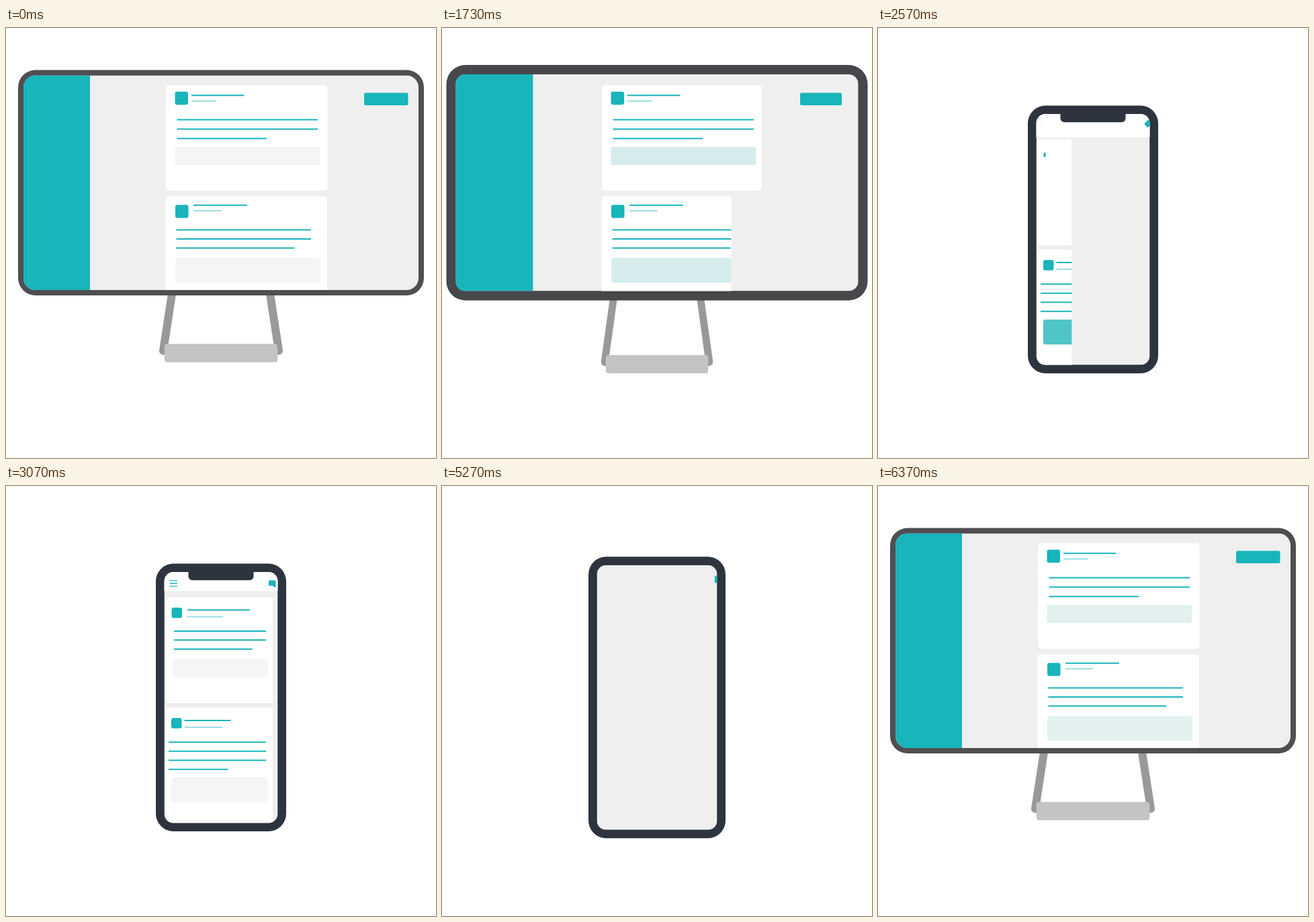
An HTML page with a canvas that plays this animation: 640 px wide and 640 px high, repeating every 7.56 s.

```html
<!DOCTYPE html>
<html lang="en">
<head>
<meta charset="utf-8">
<title>Responsive layout: desktop to phone</title>
<style>
  html, body { margin: 0; width: 100%; height: 100%; overflow: hidden; background: #fff; }
  canvas { display: block; width: 100vw; height: 100vh; }
</style>
</head>
<body>
<canvas id="stage" width="640" height="640"></canvas>
<script>
const ctx = document.getElementById('stage').getContext('2d');
const LOOP = 7560;
const TEAL = [24, 181, 187], PALE = [245, 245, 245];
const GRAY = [79, 79, 81], SLATE = [45, 52, 62];
const teal = rgb(TEAL, TEAL, 0), lightTeal = '#8fd9e0';

const desktop = { width: 240.5, radius: 5, icon: 19.5, paleGap: 8.4, boxWidth: 216, cards: [
  { x: 238, y: 85, iconX: 251.5, iconY: 94.7, boxY: 177,
    head: { x: 276, y: 100.2, width: 78.5, pale: 36.5 },
    body: { x: 254.5, y: 136.4, width: 209.5, rows: 3, step: 14, last: 133.5 } },
  { x: 237.5, y: 250.5, iconX: 252, iconY: 263.2, boxY: 342.3,
    head: { x: 279, y: 263.8, width: 80, pale: 41.5 },
    body: { x: 253.5, y: 300.5, width: 200.5, rows: 3, step: 13.45, last: 176 } }
] };
const phone = { width: 158.7, radius: 3, icon: 15.5, paleGap: 10.2, boxWidth: 143.5, cards: [
  { x: 238.5, y: 166, iconX: 246.5, iconY: 181, boxY: 258,
    head: { x: 270, y: 184.5, width: 93, pale: 53 },
    body: { x: 250, y: 215.9, width: 137, rows: 3, step: 13.45, last: 116.5 } },
  { x: 238.5, y: 330, iconX: 246, iconY: 345.2, boxY: 434,
    head: { x: 265.5, y: 348.9, width: 69, pale: 56.5 },
    body: { x: 242, y: 381.3, width: 145, rows: 4, step: 13.45, last: 88.5 } }
] };

function rgb(a, b, k) {
  return `rgb(${a.map((v, i) => Math.round(mix(v, b[i], k))).join(',')})`;
}

function mix(a, b, k) {
  return a + (b - a) * k;
}

function ease(t, from, to, power = 2) {
  const u = Math.min(1, Math.max(0, (t - from) / (to - from)));
  return u < .5 ? .5 * (2 * u) ** power : 1 - .5 * (2 - 2 * u) ** power;
}

// Rises to 1 from a to b and falls back to 0 from c to d.
function hump(t, a, b, c, d, power) {
  return ease(t, a, b, power) - ease(t, c, d, power);
}

const morph = t => hump(t, 1733, 2317, 5470, 6000, 4);
const swell = t => hump(t, 1300, 1733, 5900, 6190);

function roundPath(x, y, w, h, r) {
  ctx.beginPath();
  ctx.roundRect(x, y, w, h, r);
}

function block(color, x, y, w, h, r = 0) {
  if (w <= 0 || h <= 0) return;
  ctx.fillStyle = color;
  roundPath(x, y, w, h, r);
  ctx.fill();
}

function rule(color, x1, y1, x2, y2, width) {
  ctx.strokeStyle = color;
  ctx.lineWidth = width;
  ctx.beginPath();
  ctx.moveTo(x1, y1);
  ctx.lineTo(x2, y2);
  ctx.stroke();
}

function drawCard(layout, index, { shown, tint, dx = 0, dy = 0, grow = 1, draw = 1, boxAlpha = 1 }) {
  const { x, y, iconX, iconY, boxY, head, body } = layout.cards[index];
  const { icon, radius } = layout;
  const width = layout.width * shown;
  if (width < .3) return;
  const line = (left, top, length, color = teal, weight = 2) =>
    rule(color, left, top, left + length * draw, top, weight);

  ctx.save();
  ctx.translate(dx, dy);
  const height = layout === phone && index ? 190 : 157.2;
  block('#fff', x, y, width, height, radius * shown);
  roundPath(x, y, width, height, radius * shown);
  ctx.clip();
  block(teal, iconX, iconY + icon * (1 - grow) / 2, icon * grow * grow, icon * grow, 3);
  if (draw > 0) {
    line(head.x, head.y, head.width);
    line(head.x, head.y + layout.paleGap, head.pale, lightTeal, 1.7);
    for (let i = 0; i < body.rows; i++) {
      line(body.x, body.y + i * body.step, i < body.rows - 1 ? body.width : body.last);
    }
  }
  ctx.globalAlpha = boxAlpha;
  block(rgb(PALE, TEAL, tint), iconX, boxY, layout.boxWidth, 27 + 10 * index, 3);
  ctx.restore();
}

function drawStand(t) {
  const tuck = morph(t + 20);
  if (tuck > .9) return;
  const scale = 1 - .095 * swell(t) - .57 * tuck;
  const bottom = 497.5 + 16.5 * swell(t) - 170 * tuck ** 2.7;
  ctx.save();
  ctx.translate(320, bottom);
  ctx.scale(scale, 1);
  ctx.lineCap = 'round';
  for (const side of [-1, 1]) rule('#999', side * 86, -17, side * 70, -121, 12);
  ctx.restore();
  block('#c4c4c4', 320 - 84.2 * scale, bottom - 27.3, 168.4 * scale, 27.3, 4);
}

function drawDesktop(t, left, top, height) {
  const m = morph(t), s = swell(t), leaving = t < LOOP / 2;
  const open = Math.max(0, 1 - 1.9 * m);
  block(teal, left, top, (99 + 16 * s) * open, height);
  block(teal, 533, 96.5, (65.5 - 3.5 * s) * open, 18.5, 2.5);

  const tint = leaving ? ease(t, 1620, 2033) : .2 - .12 * ease(t, 5733, 6370);
  const hidden = [hump(t, 1618, 2442, 5450, 6209, 3), hump(t, 1467, 2184, 5600, 6322, 3)];
  for (const i of [1, 0]) {
    drawCard(desktop, i, {
      tint,
      shown: 1 - hidden[i],
      dx: m * (leaving ? .5 : 2),
      dy: m * (leaving ? 61 - 42 * i : 170 + 12 * i)
    });
  }
}

function drawHeader(t) {
  const drop = 63 * hump(t, 2200, 2520, 4750, 5200) - 6.7 * ease(t, 2520, 2800);
  block('#fff', 200, 90, 240, 10 + drop);

  for (let i = 0; i < 3; i++) {
    const y = 140.8 + i * 4.2, late = t - i * 120;
    const length = 11.5 * hump(late, 2540, 2790, 4580, 4820, 1.5);
    if (length > 0) rule(teal, 243.5, y, 243.5 + length, y, 1.3);
  }

  const away = 1 - hump(t, 2330, 2800, 4600, 5000, 3);
  ctx.save();
  ctx.translate(396.2 + 14 * away, 145 - 6 * away);
  ctx.rotate(-Math.PI / 2 * away);
  block(teal, -5.2, -4.4, 10.4, 8, .8);
  ctx.beginPath();
  ctx.moveTo(0, 3);
  ctx.lineTo(5.2, 3);
  ctx.lineTo(5.2, 6.8);
  ctx.fill();
  ctx.restore();
}

function drawPhone(t) {
  const shown = hump(t, 2310, 2917, 4540, 5230, 3);
  const tint = 1 - hump(t, 2310, 3050, 4567, 5300);
  drawCard(phone, 1, { shown, tint });
  drawCard(phone, 0, {
    shown, tint,
    grow: ease(t, 2400, 2760),
    draw: ease(t, 2590, 2880),
    boxAlpha: ease(t, 2600, 2850)
  });
  drawHeader(t);
}

function drawDevice(t) {
  const m = morph(t), s = swell(t);
  const stretch = 1 - hump(t, 2317, 2540, 4567, 5233);
  const dark = hump(t, 1530, 2030, 5250, 6105, 3);

  // The sides move first, the height follows.
  const half = mix(302 + 11.5 * s, 97 + 5 * stretch, m);
  const height = mix(335.5 + 15 * s, 398.5 + 20.5 * stretch, m ** 2.1);
  const center = mix(230.25, 314.75, m ** 1.1);
  const border = 8 + 5.5 * s + 1.5 * dark - 2.5 * m ** 4;
  const radius = 22 - 2 * dark;
  const frame = rgb(GRAY, SLATE, dark);
  const left = 320 - half, top = center - height / 2;
  const inner = [left + border, top + border, 2 * (half - border), height - 2 * border];

  block(frame, left, top, 2 * half, height, radius + border / 2);
  ctx.save();
  roundPath(...inner, radius - border / 2);
  ctx.clip();
  block('#efefef', ...inner);
  if (t < 2400 || t > 5400) drawDesktop(t, inner[0], inner[1], inner[3]);
  if (t > 2200 && t < 5400) drawPhone(t);
  const notch = 20.3 * hump(t, 2250, 2500, 5000, 5350);
  block(frame, 271.5, inner[1] - 8, 97, notch, [0, 0, 6, 6]);
  ctx.restore();
}

function render(now) {
  const t = now % LOOP;
  ctx.fillStyle = '#fff';
  ctx.fillRect(0, 0, 640, 640);
  drawStand(t);
  drawDevice(t);
}

let start;
function tick(now) {
  start ??= now;
  render(now - start);
  requestAnimationFrame(tick);
}
render(0);
requestAnimationFrame(tick);
</script>
</body>
</html>
```
